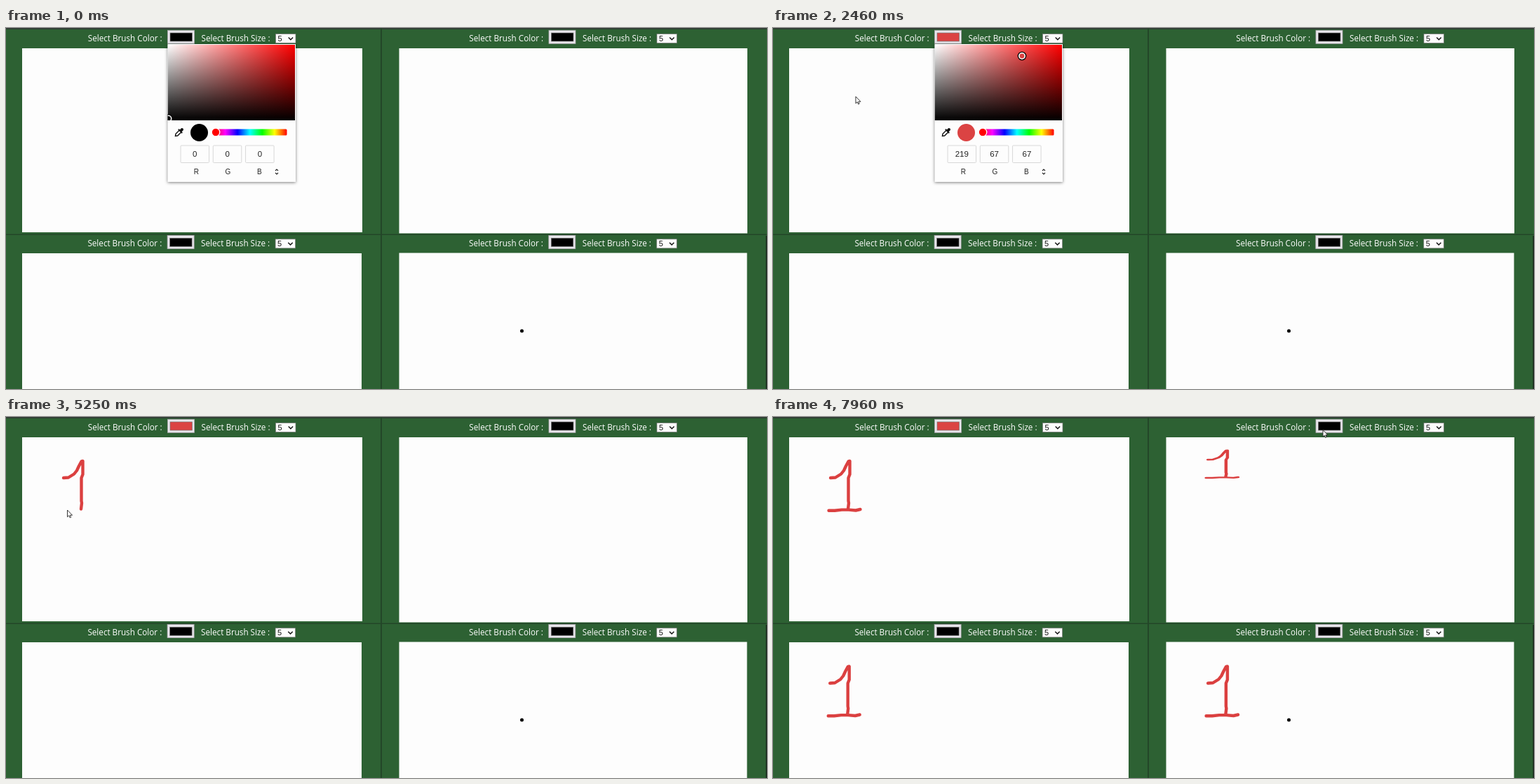
These frames come from a looping animation (1085x516 px, 8 s). An HTML page:

```html
<!DOCTYPE html>
<html lang="en">
<head>
<meta charset="utf-8">
<title>Shared whiteboard</title>
<style>
  html, body { margin: 0; width: 100%; height: 100%; overflow: hidden; background: #2d6133; }
  svg { display: block; width: 100vw; height: 100vh; }
  .label { font: 11.7px "Open Sans", "Noto Sans", sans-serif; fill: #fff; }
  .field { font: 11px "Liberation Sans", Arial, sans-serif; fill: #111; }
  .value { font: 11.5px "Liberation Sans", Arial, sans-serif; fill: #222; text-anchor: middle; }
  .channel { font: 10px "Liberation Sans", Arial, sans-serif; fill: #222; text-anchor: middle; }
  .ink { fill: none; stroke: #db4040; stroke-width: 4.4; stroke-linecap: round; stroke-linejoin: round; }
  #picker { filter: drop-shadow(0 1px 2px rgba(0, 0, 0, .5)); }
</style>
</head>
<body>
<svg viewBox="0 0 1085 516" preserveAspectRatio="none">
  <defs>
    <linearGradient id="saturation"><stop stop-color="#fff"/><stop offset="1" stop-color="#f00"/></linearGradient>
    <linearGradient id="shade" x2="0" y2="1"><stop stop-color="#000" stop-opacity="0"/><stop offset="1"/></linearGradient>
    <linearGradient id="hues"></linearGradient>
    <clipPath id="field"><rect x="230.5" y="24" width="181.5" height="108"/></clipPath>
  </defs>
  <rect width="1085" height="516" fill="#2d6133"/>
  <g id="panels"></g>
  <g fill="#234628">
    <rect width="1085" height="2" fill="#303f34"/>
    <rect x="534" width="2" height="516"/>
    <rect y="294.5" width="1085" height="1.5"/>
    <rect x="1083.5" y="297" width="1.5" height="219" fill="#17251a"/>
  </g>
  <circle cx="735.5" cy="433" r="2.5"/>

  <g id="one">
    <path class="ink" id="stem" d="M82 87 L89 86.5 L97 81.5 L101 76.500 L104 70 L107.500 63.500 L109.500 63 L109.500 82 L107.500 87 L107.500 120 L108 123 L107 131.500"/>
    <path class="ink" id="base" d="M79.500 133.800 H88 L98 132.600 L108 132.600 L118 133.500 L124.500 132"/>
  </g>
  <g id="copies">
    <use href="#one" transform="translate(537.3 12.8) scale(1.01 .555)"/>
    <use href="#one" transform="translate(-.8 293.5)"/>
    <use href="#one" transform="translate(537.3 293.5) scale(1.01 1)"/>
  </g>

  <g id="picker">
    <rect x="230.500" y="23" width="182.500" height="197" fill="#fdfdfd"/>
    <g clip-path="url(#field)">
      <rect x="230.500" y="24" width="181.500" height="108" fill="url(#saturation)"/>
      <rect x="230.500" y="24" width="181.500" height="108" fill="url(#shade)"/>
      <g id="marker">
        <circle r="4.800" fill="none" stroke="#000" stroke-width="3"/>
        <circle class="chosen" r="4.200" stroke="#fff" stroke-width="1.600"/>
      </g>
    </g>
    <g id="dropper" transform="translate(247 149) rotate(45)">
      <path d="M-1.900 -2 V5.200 L0 7.800 L1.900 5.200 V-2" fill="none" stroke="#111" stroke-width="1.400"/>
      <path d="M-3.800 -2.200 H3.800" stroke="#111" stroke-width="1.800"/>
      <rect x="-2" y="-7.500" width="4" height="5.500" rx="1.800" fill="#111"/>
    </g>
    <circle class="chosen" cx="275.500" cy="149.500" r="12.500"/>
    <rect x="295" y="144.500" width="105.500" height="9" rx="1.500" fill="url(#hues)"/>
    <circle cx="299" cy="149" r="5.800" fill="#f00" stroke="#fff" stroke-width="1.300"/>
    <g id="channels"></g>
    <path d="M384 204 L386 202 L388 204 M384 207 L386 209 L388 207" fill="none" stroke="#222" stroke-width="1.100"/>
  </g>

  <path id="cursor" d="M0 0 V9.800 L2.200 7.800 L3.700 11 L5.200 10.300 L3.800 7.300 H7 Z" fill="#fff" stroke="#222" stroke-width=".9"/>
</svg>
<script>
const $ = id => document.getElementById(id);
const LOOP = 8000, PICK = 1750, CLOSE = 3500, SHARE = 7730;
const RED = '#db4343';

// Left shift, top shift, then the board's x, y, width, height.
const panels = [
  [0, 0, 23, 29, 485, 263],
  [543.5, 0, 560.5, 29, 496.5, 264.5],
  [-.4, 293.3, 23, 322, 484, 194],
  [543.3, 293.3, 560.5, 321.5, 496, 195]
];
$('panels').innerHTML = panels.map(([dx, dy, x, y, w, h]) => `
  <g transform="translate(${dx} ${dy})">
    <text class="label" x="116.800" y="18.500">Select Brush Color :</text>
    <rect x="230.500" y="3.300" width="38" height="19" fill="#e9e7ec" stroke="#aaa6ad" stroke-width=".8"/>
    <rect class="swatch" x="234" y="7" width="31.500" height="12" stroke="#777" stroke-width=".7"/>
    <text class="label" x="278.500" y="18.500">Select Brush Size :</text>
    <rect x="384.500" y="8.500" width="28.500" height="13" fill="#fdfdfd" stroke="#777" stroke-width=".7"/>
    <text class="field" x="387.500" y="19">5</text>
    <path d="M402.700 13.500 L405.900 16.700 L409.100 13.500" fill="none" stroke="#111" stroke-width="1.500"/>
  </g>
  <rect x="${x}" y="${y}" width="${w}" height="${h}" fill="#fdfdfd"/>`).join('');

$('hues').innerHTML = ['f00', 'f0f', '00f', '0ff', '0f0', 'ff0', 'f00']
  .map((c, i) => `<stop offset="${i / 6}" stop-color="#${c}"/>`).join('');

$('channels').innerHTML = [...'RGB'].map((name, i) => {
  const x = 249 + i * 46.3;
  return `<rect x="${x}" y="168" width="40.500" height="24.500" rx="1" fill="#fdfdfd" stroke="#d8d8d8"/>
    <text class="value" x="${x + 20.3}" y="184">0</text>
    <text class="channel" x="${271.3 + i * 45}" y="209">${name}</text>`;
}).join('');

const swatch = document.querySelector('.swatch');
const chosen = document.querySelectorAll('.chosen');
const values = document.querySelectorAll('.value');
const strokes = [
  { path: $('stem'), from: 3980, to: 5020 },
  { path: $('base'), from: 5420, to: 6100 }
];
for (const s of strokes) {
  s.length = s.path.getTotalLength();
  s.path.style.strokeDasharray = `${s.length} ${s.length + 10}`;
}

// Pointer stops: time, x, y.
const stops = [
  [150, 330, -16], [800, 345, 34], [1300, 356, 40], [1900, 356, 40],
  [2250, 200, 82], [2460, 118, 98], [2740, 101, 88], [3000, 101, 88],
  [3090, 98, 84], [3670, 98, 84], [3790, 95.5, 83], [3980, 82, 87],
  [5020, 107, 131.5], [5230, 87.5, 133], [5340, 87.5, 133], [5420, 79.5, 133.8],
  [6100, 124.5, 132], [6170, 126, 130], [6480, 160, -16], [7400, 740, -16],
  [7690, 768, 46], [7940, 784, 18.5], [LOOP, 784, 18.5]
];
const clamp = v => Math.max(0, Math.min(1, v));
const show = (el, on) => { el.style.visibility = on ? 'visible' : 'hidden'; };

function pointerAt(t) {
  const drawing = strokes.find(s => t >= s.from && t <= s.to);
  if (drawing) {
    const p = drawing.path.getPointAtLength(drawing.length * (t - drawing.from) / (drawing.to - drawing.from));
    return [p.x, p.y];
  }
  const i = stops.findIndex(s => s[0] > t);
  if (i < 1) return [stops[0][1], stops[0][2]];
  const [t0, x0, y0] = stops[i - 1], [t1, x1, y1] = stops[i];
  const k = (t - t0) / (t1 - t0);
  return [x0 + (x1 - x0) * k, y0 + (y1 - y0) * k];
}

function render(t) {
  const picked = t >= PICK, color = picked ? RED : '#000';
  swatch.style.fill = color;
  chosen.forEach(el => { el.style.fill = color; });
  values.forEach((el, i) => { el.textContent = picked ? [219, 67, 67][i] : 0; });
  $('marker').setAttribute('transform', picked ? 'translate(355 40)' : 'translate(231.500 129.500)');
  show($('picker'), t < CLOSE);
  show($('copies'), t >= SHARE);
  $('copies').style.display = t >= SHARE ? '' : 'none';
  for (const s of strokes) {
    const k = clamp((t - s.from) / (s.to - s.from));
    s.path.style.strokeDashoffset = s.length * (1 - k);
    s.path.style.display = k > 0 ? '' : 'none';
  }
  $('cursor').setAttribute('transform', `translate(${pointerAt(t)})`);
}

const start = performance.now();
function tick(now) {
  render(Math.max(0, now - start) % LOOP);
  requestAnimationFrame(tick);
}
render(0);
requestAnimationFrame(tick);
</script>
</body>
</html>
```
